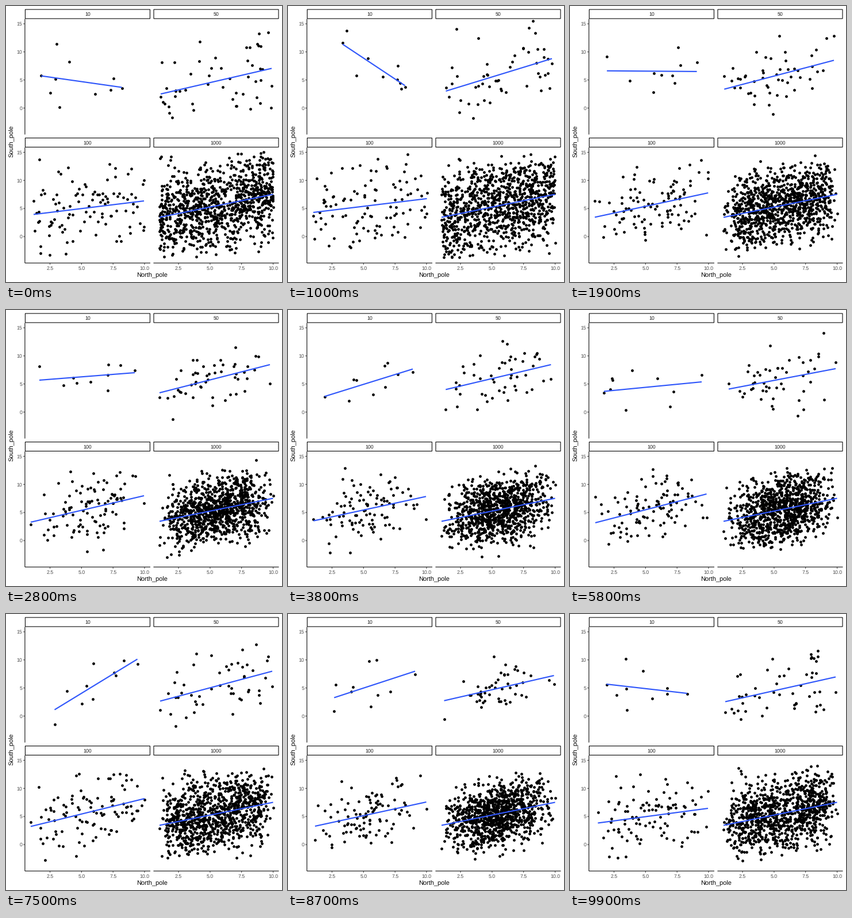
A matplotlib script for the animation above (10 s loop, 480x480 px).

```python
import numpy as np
import matplotlib.pyplot as plt
from matplotlib.animation import FuncAnimation
from matplotlib.patches import Rectangle

# All positions are in stage pixels, y pointing down.
SIZE, DPI = 480, 80
PT = 72 / DPI
LEFTS, TOPS = (32.9, 256.45), (22.5, 246)
WIDTH, HEIGHT, STRIP = 218.07, 201, 17
X_STEP, Y_STEP = 21.93, 9.77
BLUE, TICK, LABEL = "#2f56fb", "#333333", "#4d4d4d"
plt.rcParams.update({"font.family": "Liberation Sans", "text.hinting": "none"})
rng = np.random.default_rng(12)

# Trend line ends (x0, y0, x1, y1): the first two states, then the blends
# 2>3, 4>5, 5>6, 7>8 and 9>0.
TRENDS = {
    10: [(61, 121.5, 201.5, 141.5), (95, 66.5, 203.5, 138.5),
         (58, 122, 224, 109), (66.5, 164.5, 213.5, 99.5),
         (59, 141.5, 229, 125), (84.5, 166.5, 228.5, 78.5),
         (63.5, 122, 203.5, 138)],
    50: [(269, 153, 462, 108.5), (274.5, 148, 459, 91.5),
         (267, 144, 459, 95), (278, 135.5, 456.5, 95),
         (276, 137.5, 462, 102), (268, 151.5, 463, 99.5),
         (270, 152.5, 462, 109.5)],
    100: [(48, 362.5, 240, 339), (44, 359, 241.5, 335),
          (43, 369, 240, 323), (45, 365.5, 240, 325),
          (44, 370, 237.5, 320), (43, 369.5, 241, 321),
          (48.5, 363.5, 240, 338)],
    1000: [(267, 367.5, 464.5, 327.5)] * 7,
}


def mix(a, b, w):
    return a + (b - a) * w


def state_lines(n):
    """Trend of each of the ten states, solved from the blends."""
    first, second, m23, m45, m56, m78, m90 = np.array(TRENDS[n], float)
    s6 = mix(m45, m56, 3 / 2)
    s9 = mix(first, m90, 6)
    return [first, second, m23, m23, m45, m45, s6, m78, m78, s9]


def sample(n, line, top, spread):
    """Noisy cloud inside the panel whose linear fit is the given line."""
    x0, y0, x1, y1 = line
    x = rng.uniform(x0, x1, n)
    x[:2] = x0, x1
    trend = np.interp(x, [x0, x1], [y0, y1])
    y = rng.normal(trend, spread)
    while True:
        bad = (y < top + 12) | (y > top + HEIGHT - 12)
        if not bad.any():
            break
        y[bad] = rng.normal(trend[bad], spread)
    y += trend - np.polyval(np.polyfit(x, y, 1), x)
    return np.column_stack([x, y])


fig = plt.figure(figsize=(SIZE / DPI, SIZE / DPI), dpi=DPI, facecolor="white")
ax = fig.add_axes([0, 0, 1, 1])
ax.set(xlim=(0, SIZE), ylim=(SIZE, 0))
ax.axis("off")


def stroke(xs, ys, color="black"):
    ax.plot(xs, ys, color=color, lw=1.07 * PT, solid_capstyle="butt", snap=False)


def text(x, y, s, size=8.8, color=LABEL, **kw):
    ax.text(x, y, s, fontsize=size * PT, color=color, va="baseline", **kw)


class Panel:
    def __init__(self, n, left, top, spread=40):
        self.lines = state_lines(n)
        self.clouds = [sample(n, line, top, spread) for line in self.lines]
        ax.add_patch(Rectangle((left + 0.53, top - STRIP + 0.53), WIDTH - 1.07,
                               STRIP - 1.07, fc="white", ec="black",
                               lw=1.07 * PT, snap=False))
        text(left + WIDTH / 2, top - 5.2, str(n), color="#1a1a1a", ha="center")
        area = Rectangle((left, top), WIDTH, HEIGHT, fc="none", ec="none")
        ax.add_patch(area)
        self.dots, = ax.plot([], [], "o", color="black", ms=4.8 * PT, mew=0, zorder=3)
        self.trend, = ax.plot([], [], color=BLUE, lw=2.13 * PT,
                              solid_capstyle="butt", zorder=4)
        for artist in (self.dots, self.trend):
            artist.set_clip_path(area)

    def show(self, a, b, w):
        self.dots.set_data(*mix(self.clouds[a], self.clouds[b], w).T)
        x0, y0, x1, y1 = mix(self.lines[a], self.lines[b], w)
        self.trend.set_data([x0, x1], [y0, y1])


panels = [Panel(10, LEFTS[0], TOPS[0], spread=30), Panel(50, LEFTS[1], TOPS[0]),
          Panel(100, LEFTS[0], TOPS[1]), Panel(1000, LEFTS[1], TOPS[1])]

axis_x, axis_y = LEFTS[0], TOPS[1] + HEIGHT
for top in TOPS:
    stroke([axis_x, axis_x], [top, top + HEIGHT])
    for value in (0, 5, 10, 15):
        y = top + 155 - Y_STEP * value
        stroke([axis_x - 2.75, axis_x], [y, y], TICK)
        text(28.5, y + 3.2, str(value), ha="right")

for left in LEFTS:
    stroke([left, left + WIDTH], [axis_y, axis_y])
    for value in (2.5, 5, 7.5, 10):
        x = left - 11.2 + X_STEP * value
        stroke([x, x], [axis_y, axis_y + 2.75], TICK)
        text(x, 459.2, f"{value:.1f}", ha="center")

text(253.7, 472, "North_pole", 11, "black", ha="center")
text(13.5, 235.5, "South_pole", 11, "black", ha="center",
     rotation=90, rotation_mode="anchor")


def update(i):
    """Each state rests, then glides linearly to the next one."""
    state, tick = divmod(i, 10)
    rest = 3 if state == 0 else 4
    w = max(0, tick - rest) / (10 - rest)
    for panel in panels:
        panel.show(state, (state + 1) % 10, w)
    return [artist for p in panels for artist in (p.dots, p.trend)]


anim = FuncAnimation(fig, update, frames=100, interval=100, repeat=True,
                     repeat_delay=0, blit=False)
plt.show()
```
